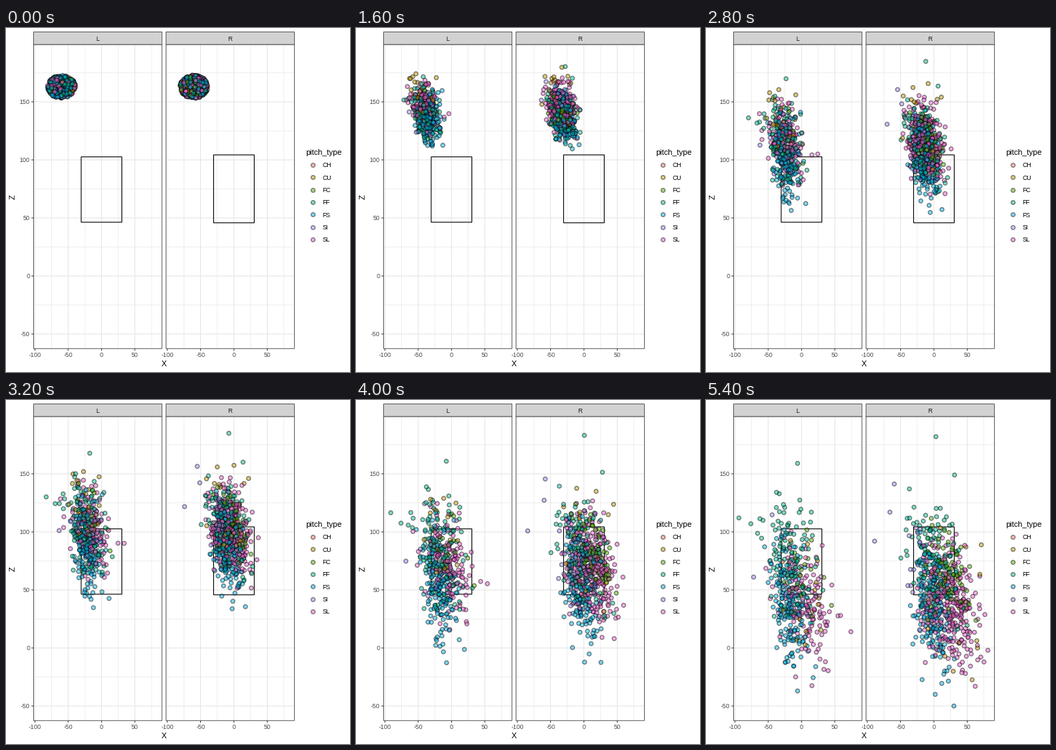
A matplotlib script that plays this animation: 480x480 px, repeating every 5500 ms.

```python
import numpy as np
import matplotlib.pyplot as plt
from matplotlib.animation import FuncAnimation
from matplotlib.colors import to_rgba
from matplotlib.patches import Rectangle

plt.rcParams["font.family"] = "Liberation Sans"
SIZE, DPI = 480, 100
PX = 72 / DPI            # points per pixel
FRAMES, STEP = 55, 0.01  # each frame is 10 ms of flight
rng = np.random.default_rng(11)

# colour; side and vertical acceleration (cm/s2), flight time (s);
# mean x, mean z, spread x, spread z at the plate; count per panel
PITCHES = {
    "CH": ("#F8766D", -450, -800, 0.450, -8, 55, 10, 15, (4, 3)),
    "CU": ("#C49A00", 200, -1200, 0.510, 15, 42, 20, 28, (22, 18)),
    "FC": ("#53B400", 40, -650, 0.448, 15, 64, 15, 20, (18, 80)),
    "FF": ("#00C094", -200, -430, 0.422, -8, 77, 20, 28, (110, 120)),
    "FS": ("#00B6EB", -420, -860, 0.442, -11, 37, 14, 27, (185, 175)),
    "SI": ("#A58AFF", -500, -600, 0.432, -34, 65, 19, 27, (6, 24)),
    "SL": ("#FB61D7", 130, -1050, 0.470, 16, 36, 21, 25, (130, 285)),
}

# widest pitches, (x, z) at the plate
WILD = {
    "L": {"FF": [(-6, 159), (-94, 112), (-76, 107)], "FS": [(-6, -37)],
          "SL": [(74, 14)]},
    "R": {"FF": [(3, 182), (31, 149)], "FS": [(2, -40), (30, -50)],
          "SI": [(-89, 92), (-66, 117)], "SL": [(81, -2), (62, -33)]},
}

RELEASE = (-60, 163)
LEAN = -0.3    # low pitches drift right
SHIFT = 8      # plate x moves left in L, right in R

# left edge, x of zero, strike zone bottom and top
PANELS = {"L": (38.5, 133.3, 46.3, 102.6), "R": (223.2, 318.0, 45.8, 104.3)}
WIDTH, TOP, BOTTOM, STRIP_TOP = 179.2, 23, 447.3, 5.5
SX, SZ, ZERO_Y = 0.93, 1.62, 346
XS, ZS = range(-100, 100, 50), range(-50, 200, 50)

fig = plt.figure(figsize=(SIZE / DPI, SIZE / DPI), dpi=DPI, facecolor="white")
ax = fig.add_axes([0, 0, 1, 1])
ax.set(xlim=(0, SIZE), ylim=(SIZE, 0))
ax.axis("off")


def row(z):
    return ZERO_Y - SZ * z


def line(xs, ys, color, width, z):
    ax.plot(xs, ys, color=color, lw=width * PX, zorder=z,
            solid_capstyle="butt", snap=False)


def box(x, y, w, h, z, face="none", edge="#4d4d4d", width=0.9):
    ax.add_patch(Rectangle((x, y), w, h, fc=face, ec=edge, lw=width * PX,
                           zorder=z, snap=False))


def label(x, y, text, size=8.8, color="black", ha="center", **kw):
    kw.setdefault("va", "baseline")
    ax.text(x, y, text, fontsize=size * PX, color=color, ha=ha, **kw)


def dots(xy, colors):
    return ax.scatter(*np.transpose(xy), s=(5.6 * PX) ** 2, c=colors,
                      edgecolors=(0, 0, 0, 0.5), linewidths=1.25 * PX,
                      zorder=4, snap=False)


def bell(n):
    """Bounded, nearly normal noise with unit spread."""
    return rng.uniform(-1, 1, (n, 4)).sum(axis=1) * 0.866


def fill(kind):
    return to_rgba(PITCHES[kind][0], 0.5)


def draw_panel(name):
    left, zero, low, high = PANELS[name]
    right = left + WIDTH
    for x in XS:
        px = zero + SX * x
        if x < 50:
            line([px + SX * 25] * 2, [TOP, BOTTOM], "#ececec", 0.8, 1)
        else:
            line([px + SX * 25] * 2, [TOP, BOTTOM], "#ececec", 0.8, 1)
        line([px] * 2, [TOP, BOTTOM], "#e4e4e4", 1, 1.1)
        line([px] * 2, [BOTTOM, BOTTOM + 3], "#333333", 1, 5)
        label(px, 459, str(x), color="#4d4d4d")
    for z in ZS:
        line([left, right], [row(z + 25)] * 2, "#ececec", 0.8, 1)
        line([left, right], [row(z)] * 2, "#e4e4e4", 1, 1.1)
    box(zero - 30.5 * SX, row(high), 61 * SX, (high - low) * SZ, 3,
        edge="black", width=1.1)
    box(left, TOP, WIDTH, BOTTOM - TOP, 5)
    box(left, STRIP_TOP, WIDTH, TOP - STRIP_TOP, 6, face="#d2d2d2")
    label(left + WIDTH / 2, 17.6, name, color="#1a1a1a", zorder=7)


def throw(name):
    """Columns: x0, z0, x1, z1, ax, az, flight time; plus the fill colours."""
    side = list(PANELS).index(name)
    rows, colors = [], []
    for kind, (_, acc_x, acc_z, flight, mx, mz, sx, sz, count) in PITCHES.items():
        u, v = bell(count[side]), bell(count[side])
        x1 = mx + SHIFT * (2 * side - 1) + sx * u
        z1 = mz + sz * (LEAN * u + np.sqrt(1 - LEAN**2) * v)
        wild = np.reshape(WILD[name].get(kind, []), (-1, 2))
        x1, z1 = np.append(x1, wild[:, 0]), np.append(z1, wild[:, 1])
        n = len(x1)
        # release points fill a flat oval
        r, a = np.sqrt(rng.random(n)), rng.uniform(0, 2 * np.pi, n)
        x0 = RELEASE[0] + 21 * r * np.cos(a)
        z0 = RELEASE[1] + 10 * r * np.sin(a)
        rows.append(np.column_stack([
            x0, z0, x1, z1, acc_x + 60 * bell(n), acc_z + 50 * bell(n),
            flight + 0.01 * bell(n)]))
        colors += [fill(kind)] * n
    rows, colors = np.vstack(rows), np.array(colors)
    order = rng.permutation(len(rows))
    return rows[order], colors[order]


def place(flights, zero, time):
    x0, z0, x1, z1, acc_x, acc_z, end = flights.T
    t = np.minimum(time, end)
    part, bend = t / end, 0.5 * t * (t - end)
    x = x0 + (x1 - x0) * part + acc_x * bend
    z = z0 + (z1 - z0) * part + acc_z * bend
    return np.column_stack([zero + SX * x, row(z)])


for panel in PANELS:
    draw_panel(panel)
for z in ZS:
    line([35.5, 38.5], [row(z)] * 2, "#333333", 1, 5)
    label(33.5, row(z) + 3.2, str(z), color="#4d4d4d", ha="right")
label(220, 472, "X", 11)
label(10, 235.5, "Z", 11, rotation=90, va="center")

label(418.7, 177, "pitch_type", 11, ha="left")
for i, kind in enumerate(PITCHES):
    y = 191.1 + 17.3 * i
    dots([(427.5, y)], [fill(kind)])
    label(441.5, y + 3.4, kind, ha="left")

swarms = []
for panel, (_, zero, _, _) in PANELS.items():
    flights, colors = throw(panel)
    swarms.append((dots(place(flights, zero, 0), colors), flights, zero))


def update(frame):
    for swarm, flights, zero in swarms:
        swarm.set_offsets(place(flights, zero, frame * STEP))
    return [s[0] for s in swarms]


anim = FuncAnimation(fig, update, frames=FRAMES, interval=100, repeat=True,
                     repeat_delay=0, blit=False)
plt.show()
```
